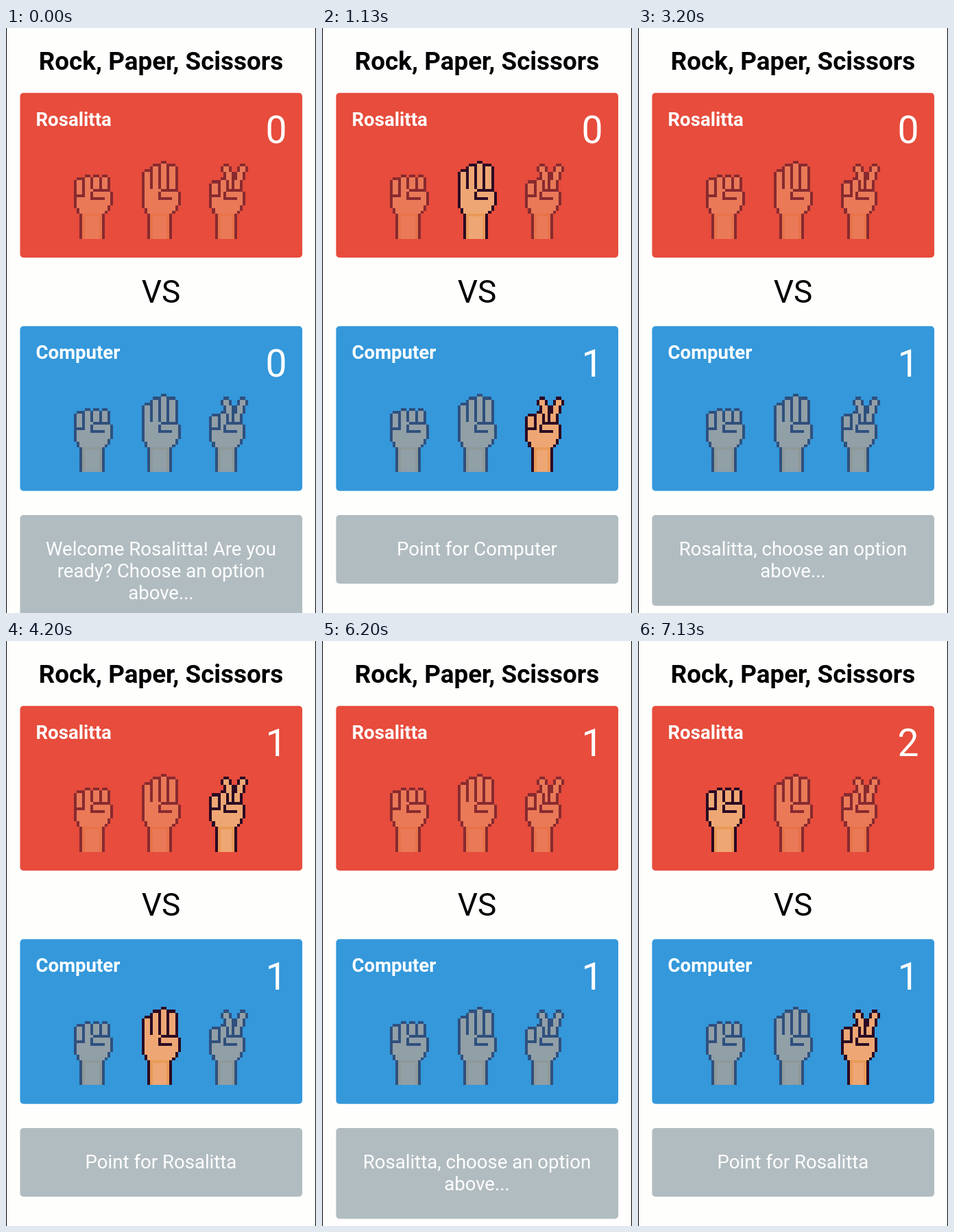
Recreate the animation shown at these times as an HTML page. Size 452 by 854 pixels, loop 8000 ms.

```html
<!DOCTYPE html>
<html lang="en">
<head>
<meta charset="utf-8">
<title>Rock, Paper, Scissors</title>
<style>
  html, body { margin: 0; width: 100%; height: 100%; overflow: hidden; background: #fefefd; }
  svg { display: block; width: 452px; height: 854px; font-family: Roboto, Arial, sans-serif; }
  text { text-anchor: middle; }
  .title { font-size: 36.8px; font-weight: 700; }
  .versus { font-size: 46px; }
  .name { font-size: 27.6px; font-weight: 700; fill: #fff; text-anchor: start; }
  .score { font-size: 55.2px; fill: #fff; text-anchor: end; }
  .line { font-size: 27.6px; fill: #fff; }
  .hand { shape-rendering: crispEdges; }
</style>
</head>
<body>
<svg id="stage" viewBox="0 0 452 854"></svg>
<script>
const PLAYER = 'Rosalitta', LINE = 32.2, CELL = 4.07;
const INK = '#2b0a24', SKIN = '#eea774', SHADE = '#e99a57';
const stage = document.getElementById('stage');

// Hands are built from bars on a grid of 28 rows.
const bar = (x, y, w = 1, h = 1, fill = INK) =>
  `<rect x="${x}" y="${y}" width="${w}" height="${h}" fill="${fill}"/>`;

// A finger two cells wide inside its outline; a lean shifts it every third row.
function finger(x, top, end, lean = 0) {
  let out = bar(x + 1, top, 2);
  for (let y = top + 1; y <= end; y++) {
    const left = x + lean * Math.floor((y - top) / 3);
    out += bar(left, y, 4) + bar(left + 1, y, 2, 1, SKIN);
  }
  return out;
}

const fingers = (tops, firstEnd) =>
  tops.map((top, i) => finger(3 * i, top, i ? 9 : firstEnd)).join('');

// Palm, thumb and forearm; right is the outermost column.
function palm(right) {
  return bar(1, 8, right - 1, 9, SKIN) + bar(2, 17, right - 3, 2, SKIN) +
    bar(3, 19, right - 6, 9, SHADE) + bar(4, 20, right - 8, 8, SKIN) +
    bar(0, 8, 1, 9) + bar(1, 17, 1, 2) + bar(2, 19, 1, 9) +
    bar(right, 11, 1, 5) + bar(right - 1, 16, 1, 2) + bar(right - 2, 18) + bar(right - 3, 19, 1, 9) +
    bar(right - 1, 9, 1, 2) +
    bar(right - 6, 10, 6) + bar(right - 7, 11, 1, 3) + bar(right - 6, 13, 4);
}

const knuckle = bar(1, 12, 3);
const hands = [
  palm(13) + fingers([6, 5, 5, 5], 12) + knuckle,
  palm(13) + fingers([3, 1, 0, 1], 9),
  palm(12) + finger(4, 1, 9, 1) + finger(10, 1, 9, -1) + fingers([7, 6], 12) + knuckle
];

function card(y, color, name) {
  return `<rect x="20.5" y="${y}" width="411.5" height="240.5" rx="5" fill="${color}"/>
    <text class="name" x="43.5" y="${y + 47.7}">${name}</text>
    <text class="score" x="409.5" y="${y + 73.5}"></text>` +
    hands.map((art, i) => `<g class="hand"
      transform="translate(${99 + 98.7 * i} ${y + 99.2}) scale(${CELL})">${art}</g>`).join('');
}

stage.innerHTML = `
  <text class="title" x="226" y="61">Rock, Paper, Scissors</text>
  ${card(94.8, '#e74c3c', PLAYER)}
  <text class="versus" x="226" y="401">VS</text>
  ${card(435.2, '#3498db', 'Computer')}
  <rect id="box" x="20.5" y="711" width="411.5" rx="5" fill="#b1bcc0"/>
  <g id="message"></g>
  <path d="M0 0h1v854h-1zM451 0h1v854h-1z"/>`;

const scores = stage.querySelectorAll('.score');
const sprites = stage.querySelectorAll('.hand');
const box = document.getElementById('box');
const message = document.getElementById('message');

// Picks: 0 rock, 1 paper, 2 scissors; player first.
const rounds = [
  { start: 1070, end: 3200, picks: [1, 2] },
  { start: 4000, end: 6200, picks: [2, 1] },
  { start: 6930, end: 8000, picks: [0, 2] }
];
const winner = ([a, b]) => (a - b + 3) % 3 === 1 ? 0 : 1;

function show(t) {
  const played = rounds.filter(r => r.start <= t);
  const last = played.at(-1);
  const picks = last && t < last.end ? last.picks : [];

  let lines = [`Welcome ${PLAYER}! Are you`, 'ready? Choose an option', 'above...'];
  if (picks.length) lines = [`Point for ${[PLAYER, 'Computer'][winner(picks)]}`];
  else if (last) lines = [`${PLAYER}, choose an option`, 'above...'];

  scores.forEach((s, side) => {
    s.textContent = played.filter(r => winner(r.picks) === side).length;
  });
  sprites.forEach((s, i) => {
    s.setAttribute('opacity', picks[Math.floor(i / 3)] === i % 3 ? 1 : 0.5);
  });
  box.setAttribute('height', 68 + LINE * lines.length);
  message.innerHTML = lines.map((text, i) =>
    `<text class="line" x="226" y="${770 + LINE * i}">${text}</text>`).join('');
}

function frame() {
  show(performance.now() % 8000);
  requestAnimationFrame(frame);
}
frame();
</script>
</body>
</html>
```
